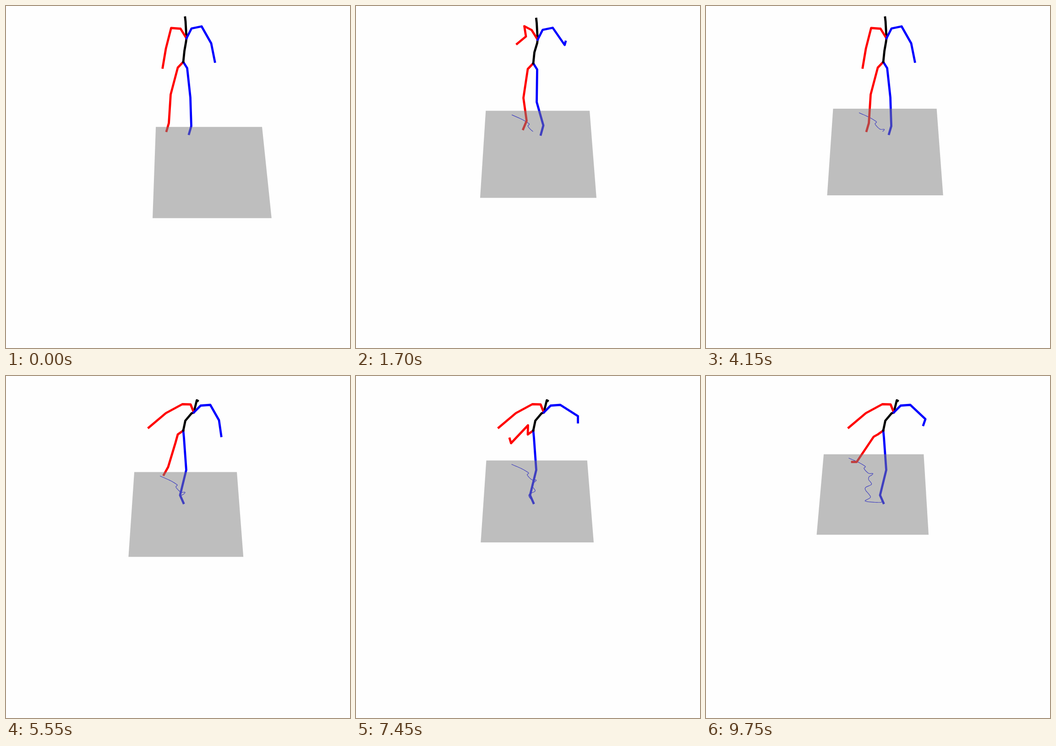
Write an HTML page with a canvas that moves like this. It is 751x746 px and loops after 9.8 s.

```html
<!DOCTYPE html>
<html lang="en">
<head>
<meta charset="utf-8">
<title>Balancing figure</title>
<style>
  html, body { margin: 0; width: 100%; height: 100%; overflow: hidden; background: #fefefe; }
  canvas { display: block; }
</style>
</head>
<body>
<canvas id="stage" width="751" height="746"></canvas>
<script>
const ctx = document.getElementById('stage').getContext('2d');
const LOOP = 9800, STEP = 50;
const CENTER = 386, GROUND = 273.3;

// Joint chains in drawing order; each starts at a joint that is already placed.
const limbs = [
  ['#f00', 'root hipR kneeR ankleR toeR'],
  ['#00f', 'root hipL kneeL ankleL toeL'],
  ['#000', 'root waist ribs chest neck head'],
  ['#f00', 'chest collarR shoulderR elbowR wristR'],
  ['#00f', 'chest collarL shoulderL elbowL wristL']
].map(([color, names]) => ({ color, names: names.split(' ') }));

// A pose gives every joint as an offset from the one before it.
const stand = {
  root: [387, 122],
  hipR: [-12, 12.5], kneeR: [-15.5, 58.5], ankleR: [-4, 62.5], toeR: [-5, 17],
  hipL: [8.5, 13.5], kneeL: [7, 64], ankleL: [2, 62.5], toeL: [-5, 17],
  waist: [2.5, -24], ribs: [3.5, -20], chest: [1, -7.5], neck: [-2, -36.5], head: [-1, -9],
  collarR: [-13, -21], shoulderR: [-20.5, -1.5], elbowR: [-11.5, 45], wristR: [-7, 41.5],
  collarL: [11, -21.5], shoulderL: [22, -4.5], elbowL: [21, 37], wristL: [8, 40]
};
const lean = {
  root: [387, 119],
  hipR: [-12, 8.5], kneeR: [-9, 5], ankleR: [-37, 55], toeR: [-10, 0],
  hipL: [1.5, 16], kneeL: [5, 70], ankleL: [-13.5, 55], toeL: [7.5, 17],
  waist: [4.5, -21.5], ribs: [13.5, -16], chest: [5, -2], neck: [6.5, -26.5], head: [2, 1],
  collarR: [-7, -17.5], shoulderR: [-18, -0.5], elbowR: [-36, 19.5], wristR: [-37.5, 31.5],
  collarL: [15, -15], shoulderL: [21, -1.5], elbowL: [33, 31], wristL: [-4.5, 13]
};
const raise = {
  ...stand,
  elbowR: [-3, -7], wristR: [-5, -28], elbowL: [26, 14], wristL: [3, -30]
};
const settle = {
  ...stand, root: [387, 125], ribs: [6, -20],
  kneeR: [-9.5, 63], ankleR: [7, 50], toeR: [-7.5, 18],
  kneeL: [-1, 71], ankleL: [14.5, 51], toeL: [-5.5, 20],
  shoulderR: [-16, -8.5], elbowR: [3.5, 22.5], wristR: [-19.5, 16],
  elbowL: [26, 37.5], wristL: [2, -7]
};
const dip = {
  ...lean, kneeR: [-5, 18], ankleR: [-16, 53], toeR: [-9.5, 17],
  elbowL: [19, 33.5], wristL: [5, 34.5]
};
const tuck = {
  ...lean, kneeR: [0.5, -20], ankleR: [-37, 39], toeR: [-3, -10],
  elbowL: [38.5, 24.5], wristL: [0, 13.5]
};
const stride = {
  ...stand, root: [387, 125], head: [0, -9],
  kneeR: [-23.5, 60], ankleR: [-18.5, 62], toeR: [-8, 18],
  kneeL: [4.5, 66], ankleL: [-7, 56], toeL: [3, 17],
  elbowR: [-14, 41.5], wristR: [-18, 42], elbowL: [20, 34.5], wristL: [15, 43.5]
};
const poses = [
  [0, stand], [1000, raise], [1700, settle], [2500, stand], [4950, stand], [5550, dip],
  [6500, stand], [7450, tuck], [8250, stand], [9000, stride], [9750, lean]
];

// Walked route: time, then place on the floor (0 to 1 across and towards the viewer).
const route = [
  [0, .254, .048], [500, .356, .103], [750, .411, .143], [1000, .42, .157],
  [1250, .407, .177], [1700, .453, .236], [2000, .488, .237], [3000, .493, .245],
  [4150, .48, .261], [4500, .458, .279], [5000, .454, .313], [5550, .473, .345],
  [6000, .481, .376], [6400, .429, .41], [7000, .428, .447], [7450, .461, .498],
  [8000, .473, .539], [8350, .426, .581], [9000, .555, .598], [9750, .591, .584]
];

const mix = (a, b, k) => a + (b - a) * k;

function segment(keys, t) {
  let i = 0;
  while (i < keys.length - 2 && t >= keys[i + 1][0]) i++;
  return [i, (t - keys[i][0]) / (keys[i + 1][0] - keys[i][0])];
}

// Smooth curve through the route, with each slope taken from the neighbours.
function walker(t) {
  const [i, k] = segment(route, t);
  const a = route[i], b = route[i + 1];
  const before = route[i - 1] || a, after = route[i + 2] || b;
  return [1, 2].map(c => {
    const run = b[0] - a[0];
    const m = run * (b[c] - before[c]) / (b[0] - before[0]);
    const n = run * (after[c] - a[c]) / (after[0] - a[0]);
    const d = b[c] - a[c];
    return a[c] + k * (m + k * (3 * d - 2 * m - n + k * (m + n - 2 * d)));
  });
}

// Perspective floor, placed so that the walker's spot stays below the body.
function makeFloor([u, s]) {
  const far = (GROUND - 132.3 * s) / (1 + 0.2526 * s);
  const near = 132.3 + 1.2526 * far;
  const width = 218 + 0.147 * (far - 169);
  return ([pu, ps]) => [CENTER + (pu - u) * width * (1 + 0.12 * ps), mix(far, near, ps)];
}

function trace(points) {
  ctx.beginPath();
  points.forEach(p => ctx.lineTo(...p));
}

function stroke(points, color, width) {
  trace(points);
  ctx.strokeStyle = color;
  ctx.lineWidth = width;
  ctx.stroke();
}

function drawFigure(t) {
  const [i, k] = segment(poses, t);
  const a = poses[i][1], b = poses[i + 1][1];
  const ease = k * k * (3 - 2 * k);
  const offset = name => a[name].map((v, c) => mix(v, b[name][c], ease));
  const at = { root: offset('root') };
  for (const { color, names } of limbs) {
    names.slice(1).forEach((name, j) => {
      const [x, y] = at[names[j]], [dx, dy] = offset(name);
      at[name] = [x + dx, y + dy];
    });
    stroke(names.map(name => at[name]), color, 4.8);
  }
}

function draw(t) {
  ctx.fillStyle = '#fefefe';
  ctx.fillRect(0, 0, 751, 746);
  ctx.lineJoin = 'round';
  ctx.lineCap = 'square';

  const place = makeFloor(walker(t));
  const trail = [];
  for (let past = 0; past <= t; past += STEP) trail.push(place(walker(past)));
  if (t > 0) stroke(trail, '#00f', 1.2);

  drawFigure(t);

  trace([[0, 0], [1, 0], [1, 1], [0, 1]].map(place));
  ctx.fillStyle = 'rgba(128,128,128,0.5)';
  ctx.fill();
}

const start = performance.now();
function tick() {
  const t = (performance.now() - start) % LOOP;
  draw(Math.floor(t / STEP) * STEP);
  requestAnimationFrame(tick);
}
tick();
</script>
</body>
</html>
```
